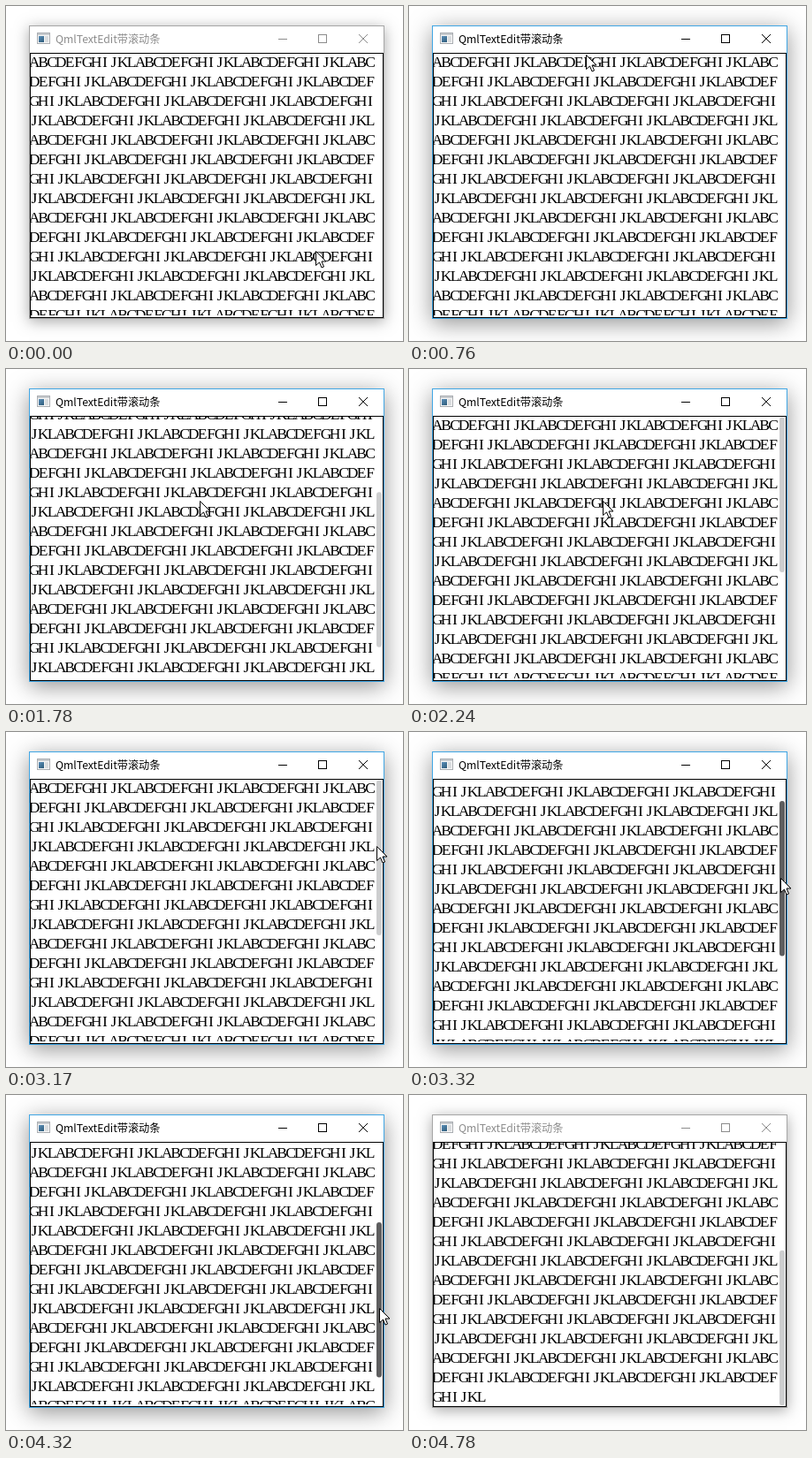
Animation, 449 px wide and 379 px high, one loop 4860 ms. Source, as an HTML page with a canvas:

```html
<!DOCTYPE html>
<html lang="zh">
<head>
<meta charset="utf-8">
<title>Scrolling text area</title>
<style>
html, body { margin: 0; width: 100%; height: 100%; overflow: hidden; background: #fff; }
canvas { display: block; width: 449px; height: 379px; }
</style>
</head>
<body>
<canvas id="stage" width="449" height="379"></canvas>
<script>
const ctx = document.getElementById('stage').getContext('2d');
const LOOP = 4860, TICKS = 63;
const LETTERS = 'ABCDEFGHIJKL';
const TEXT = LETTERS.repeat(72);
const COLUMNS = 39, CELL = 10, LINE = 22, ROWS = 23;
const VIEW = { x: 28, y: 54, w: 398, h: 298 };
const BAR_RATIO = VIEW.h / (ROWS * LINE);

// Keys are [tick, ...values], joined by straight segments.
const POINTER = [
  [0, 350, 277], [1, 342, 257], [4, 228, 44], [5, 206, 15], [6, 195, 12],
  [7, 194, 26], [8, 196, 36], [11, 208, 92], [14, 219, 149], [32, 219, 149],
  [33, 232, 148], [36, 335, 138], [39, 417, 130], [41, 419, 129], [42, 419, 136],
  [46, 421, 250], [47, 420, 210], [48, 419, 161], [49, 419, 132], [51, 419, 125],
  [54, 419, 125], [55, 421, 182], [56, 422, 241], [57, 421, 260], [58, 416, 264]
];
const SCROLL = [
  [17, 0], [18, 51], [19, 72], [22, 72], [23, 144], [25, 144], [26, 93], [27, 72],
  [28, 72], [29, 0], [42, 0], [43, 40], [45, 170], [46, 206], [47, 190], [48, 133],
  [49, 62], [50, 12], [51, 0], [54, 0], [55, 62], [56, 152], [57, 194], [58, 206]
];
const BAR_ALPHA = [[17, 0], [18, 1], [34, 1], [37, 0], [38, 0], [39, 1]];

function valuesAt(keys, tick) {
  const next = keys.findIndex(key => key[0] > tick);
  if (next < 0) return keys[keys.length - 1].slice(1);
  if (next === 0) return keys[0].slice(1);
  const a = keys[next - 1], b = keys[next];
  const part = (tick - a[0]) / (b[0] - a[0]);
  return a.slice(1).map((value, i) => value + (b[i + 1] - value) * part);
}

// Use a narrow serif where its condensed width is installed.
function chooseFont() {
  const narrow = "extra-condensed 18.5px 'Noto Serif', serif";
  ctx.font = narrow;
  return ctx.measureText('H').width < 11.8 ? narrow : "17.5px 'Liberation Serif', serif";
}
const bodyFont = chooseFont();
ctx.font = bodyFont;
const baseline = Math.round(63 + ctx.measureText('H').actualBoundingBoxAscent / 2);

function line(color, ...points) {
  ctx.strokeStyle = color;
  ctx.lineWidth = 1;
  ctx.beginPath();
  points.forEach(([x, y], i) => i ? ctx.lineTo(x, y) : ctx.moveTo(x, y));
  ctx.stroke();
}

function box(color, x, y, w, h) {
  ctx.fillStyle = color;
  ctx.fillRect(x, y, w, h);
}

function frame(color, x, y, w, h) {
  ctx.strokeStyle = color;
  ctx.lineWidth = 1;
  ctx.strokeRect(x + .5, y + .5, w - 1, h - 1);
}

function drawIcon() {
  box('#f7f7f7', 35, 30, 15, 13);
  frame('#a9adb1', 35, 30, 15, 13);
  box('#c8cbce', 36, 31, 13, 2);
  const blue = ctx.createLinearGradient(37, 34, 42, 41);
  blue.addColorStop(0, '#5b8fb9');
  blue.addColorStop(1, '#315f7d');
  box(blue, 37, 34, 6, 7);
  box('#d9dcde', 44, 34, 4, 7);
}

function drawWindow(active) {
  const ink = active ? '#000' : '#8c8c8c';
  ctx.save();
  ctx.shadowColor = active ? 'rgba(0,0,0,.42)' : 'rgba(0,0,0,.34)';
  ctx.shadowBlur = active ? 24 : 15;
  ctx.shadowOffsetY = active ? 5 : 3;
  box('#fff', 26, 22, 402, 332);
  ctx.restore();
  frame(active ? '#40a6e4' : '#a6a6a6', 26, 22, 402, 332);
  drawIcon();
  ctx.font = "12.2px 'Noto Sans CJK SC', 'Noto Sans CJK', sans-serif";
  ctx.textAlign = 'left';
  ctx.fillStyle = ink;
  ctx.fillText('QmlTextEdit带滚动条', 56, 42);
  line(ink, [308, 37.5], [318, 37.5]);
  frame(ink, 353, 32, 10, 10);
  line(ink, [399, 32], [409, 42]);
  line(ink, [409, 32], [399, 42]);
  frame('#000', 27, 53, 400, 300);
}

function drawText(scroll) {
  ctx.save();
  ctx.beginPath();
  ctx.rect(VIEW.x - 1, VIEW.y, VIEW.w, VIEW.h - 2);
  ctx.clip();
  ctx.font = bodyFont;
  ctx.textAlign = 'center';
  ctx.fillStyle = '#000';
  for (let row = 0; row < ROWS; row++) {
    const y = baseline + row * LINE - Math.round(scroll);
    if (y < VIEW.y || y > VIEW.y + VIEW.h + LINE) continue;
    const columns = row === ROWS - 1 ? 6 : COLUMNS;
    for (let col = 0; col < columns; col++) {
      ctx.fillText(TEXT[row * COLUMNS + col], 32 + col * CELL, y);
    }
  }
  ctx.restore();
}

function drawBar(scroll, alpha, pressed) {
  ctx.save();
  ctx.globalAlpha = .75 * alpha;
  ctx.fillStyle = pressed ? '#28282a' : '#bdbebf';
  ctx.beginPath();
  ctx.roundRect(419, 54.5 + scroll * BAR_RATIO, 6, VIEW.h * BAR_RATIO, 3);
  ctx.fill();
  ctx.restore();
}

function drawPointer([x, y]) {
  ctx.save();
  ctx.translate(Math.round(x) + .5, Math.round(y) + .5);
  const arrow = new Path2D('M0 0V16L4 12.5L6.5 18.5L9 17.5L6.5 11.5H11.5Z');
  ctx.fillStyle = '#fff';
  ctx.fill(arrow);
  ctx.strokeStyle = '#000';
  ctx.lineWidth = 1;
  ctx.stroke(arrow);
  ctx.restore();
}

function draw(time) {
  const tick = Math.floor((time % LOOP + 4) / (LOOP / TICKS)) % TICKS;
  const [scroll] = valuesAt(SCROLL, tick);
  const [alpha] = valuesAt(BAR_ALPHA, tick);
  box('#fff', 0, 0, 449, 379);
  drawWindow(tick >= 8 && tick < 62);
  drawText(scroll);
  drawBar(scroll, alpha, tick >= 42 && tick < 62);
  if (tick < 62) drawPointer(valuesAt(POINTER, tick));
}

function play() {
  draw(performance.now());
  requestAnimationFrame(play);
}
play();
</script>
</body>
</html>
```
